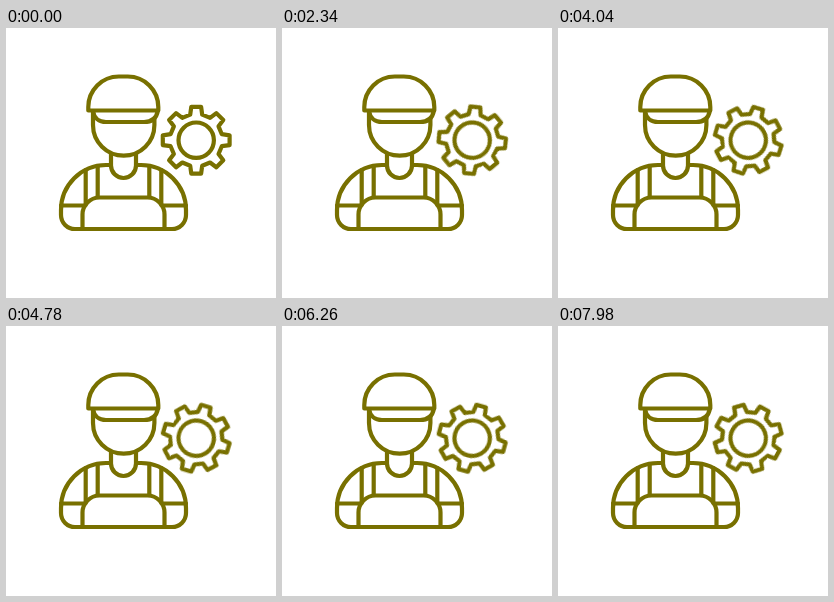
Recreate the animation shown at these times as an HTML page. Size 270 by 270 pixels, loop 8 s.

```html
<!DOCTYPE html>
<html lang="en">
<head>
<meta charset="utf-8">
<title>Worker and gear</title>
<style>
  html, body { margin: 0; width: 100%; height: 100%; overflow: hidden; background: #fff; }
  svg { display: block; width: 100%; height: 100%; }
  .lines { fill: none; stroke: #787000; stroke-width: 4.2; stroke-linejoin: round; stroke-linecap: round; }
  /* One turn takes six seconds; the loop cuts back after eight. */
  #gear { transform-origin: 190.2px 112.2px; animation: turn 8s steps(400) infinite; }
  @keyframes turn { to { transform: rotate(480deg); } }
</style>
</head>
<body>
<svg viewBox="0 0 270 270">
  <g class="lines">
    <g id="cap">
      <path d="M82.300 82.500V79A30.500 30.500 0 0 1 112.800 48.500H121.800A30.500 30.500 0 0 1 152.300 79V82.500Z"/>
      <path d="M87 83C88 90 93 94 100 94H138C146 94 150.500 90 151.800 83"/>
    </g>
    <path id="face" d="M87 83V97A30.700 30.700 0 0 0 148.400 97V91"/>
    <path id="neck" d="M105 126V137.500A12.500 12.500 0 0 0 130 137.500V126"/>
    <path id="body" d="M105 137H100A45 45 0 0 0 55 182V187A14 14 0 0 0 69 201H166A14 14 0 0 0 180 187V182A45 45 0 0 0 135 137H130"/>
    <path id="straps" d="M79.700 142V177M91.700 138V169M143.300 138V169M155.300 142V177M55 177.500H78M157 177.500H180"/>
    <path id="bib" d="M76.500 201V186.500A17 17 0 0 1 93.500 169.500H141.500A17 17 0 0 1 158.500 186.500V201"/>
    <g id="gear">
      <circle cx="190.2" cy="112.2" r="17.7"/>
      <path id="teeth"/>
    </g>
  </g>
</svg>
<script>
  const center = { x: 190.2, y: 112.2 };
  const tooth = [[-6, -25.6], [-4.9, -33.4], [4.9, -33.4], [6, -25.6]];

  const place = ([x, y], angle) => {
    const c = Math.cos(angle), s = Math.sin(angle);
    return `${(center.x + x * c - y * s).toFixed(2)} ${(center.y + x * s + y * c).toFixed(2)}`;
  };

  const points = Array.from({ length: 8 }, (_, i) =>
    tooth.map(p => place(p, i * Math.PI / 4))).flat();
  document.getElementById('teeth').setAttribute('d', `M${points.join('L')}Z`);
</script>
</body>
</html>
```
